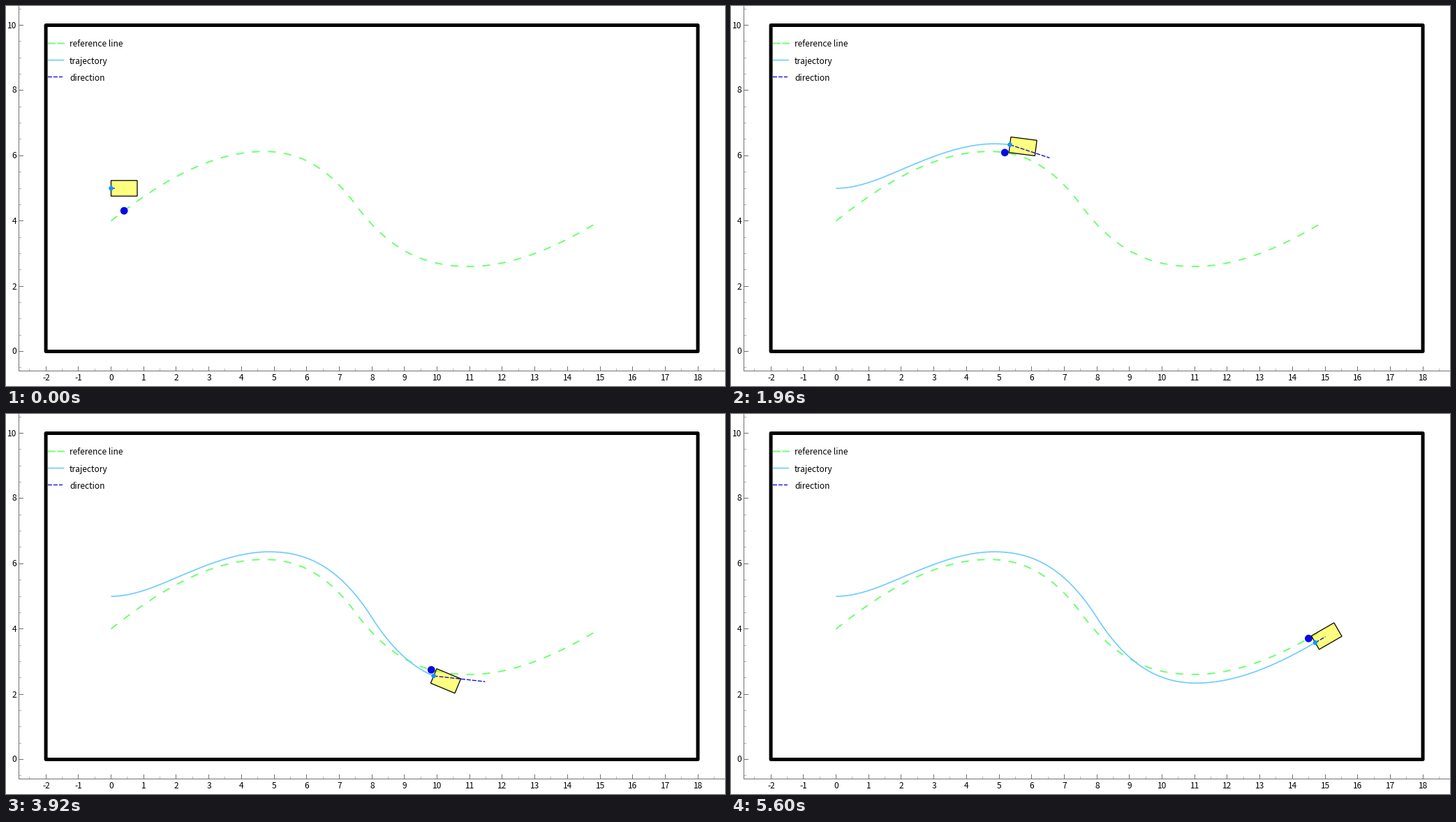
A matplotlib script for the animation above (5.64 s loop, 1030 by 544 pixels).

```python
import numpy as np
import matplotlib.pyplot as plt
from matplotlib.animation import FuncAnimation
from matplotlib.patches import Circle, Polygon, Rectangle

W, H, DPI = 1030, 544, 100
PX = 72 / DPI            # one pixel in points
UNIT = 46.7              # pixels per plot unit
X0, Y0 = 150.5, 494.5    # pixel place of the plot's zero
FRAMES, STEP = 141, 40
CAR_L, CAR_W = 37.5, 22.4
HORIZON, LAG = 12, .12   # steps looked ahead; how far the dot trails

GREEN, SKY, NAVY = "#70ff70", "#70ccff", "#0000e0"

# key points: x, y, slope
REFERENCE = [(0, 4, .8), (4.7, 6.13, 0), (7.5, 4.5, -1.36),
             (11, 2.605, 0), (15, 4, .6)]
TRACK = [(0, 5, 0), (2, 5.57, .43), (4.85, 6.365, 0), (8, 4.35, -1.57),
         (11.05, 2.34, 0), (14.7, 3.58, .577)]

plt.rcParams["path.snap"] = False


def curve(keys, count=3000):
    """Smooth cubic path through the key points."""
    x, y, m = np.array(keys, float).T
    q = np.linspace(x[0], x[-1], count)
    i = np.clip(np.searchsorted(x, q, side="right") - 1, 0, len(x) - 2)
    h, d = x[i + 1] - x[i], y[i + 1] - y[i]
    t = (q - x[i]) / h
    a, b = m[i] * h - d, d - m[i + 1] * h
    return q, y[i] + t * d + t * (1 - t) * (a * (1 - t) + b * t)


def sx(x):
    return X0 + UNIT * x


def sy(y):
    return Y0 - UNIT * y


ref_x, ref_y = curve(REFERENCE)
trk_x, trk_y = curve(TRACK)
arc = np.r_[0, np.cumsum(np.hypot(np.diff(trk_x), np.diff(trk_y)))]
heading = np.arctan(np.gradient(trk_y, trk_x))
bend = np.gradient(heading, arc)

# speed up, ease off in the first bend, brake at the end
n = np.arange(FRAMES)
pace = np.minimum(1, (n + 1) / 14) * np.clip((142.7 - n) / 12, 0, 1)
pace *= 1 - .2 * np.exp(-((n - 54) / 11) ** 4)
gone = np.r_[0, np.cumsum((pace[1:] + pace[:-1]) / 2)]
scale = arc[-1] / gone[-1]
place = np.searchsorted(arc, gone * scale).clip(0, len(arc) - 1)
speed = pace * scale

fig = plt.figure(figsize=(W / DPI, H / DPI), dpi=DPI, facecolor="white")
ax = fig.add_axes([0, 0, 1, 1])
ax.set_xlim(0, W)
ax.set_ylim(H, 0)
ax.axis("off")


def line(x, y, color, width, z, **kw):
    return ax.plot(x, y, color=color, lw=width * PX, zorder=z,
                   solid_capstyle="butt", **kw)[0]


def label(x, y, s, ha):
    ax.text(x, y, s, ha=ha, va="baseline", fontsize=12 * PX, color="black",
            family="Noto Sans CJK JP")


def draw_axes():
    grey, pale = "#707070", "#b4b4b4"
    line([18.5, 18.5], [0, 523], grey, 1, 1)
    line([18, W], [522.5, 522.5], grey, 1, 1)
    for k in range(-1, 22):
        y = np.floor(sy(k / 2)) + .5
        major = k % 4 == 0
        line([19, 25 if major else 22], [y, y], grey if major else pale, 1, 1)
        if major:
            label(15, y + 4, str(k // 2), "right")
    for k in range(-5, 38):
        x = np.floor(sx(k / 2)) + .5
        major = k % 2 == 0
        line([x, x], [516 if major else 519, 522], grey if major else pale, 1, 1)
        if major and k <= 36:
            label(x, 536, str(k // 2), "center")


def draw_legend():
    line([60, 84], [53.5, 53.5], GREEN, 2, 4, ls=(0, (5.5, 1.2)))
    line([60, 83], [77.5, 77.5], SKY, 1.7, 4)
    line([60, 81], [101.5, 101.5], NAVY, 1.3, 4, ls=(0, (4.6, 1.5)))
    for i, s in enumerate(("reference line", "trajectory", "direction")):
        label(91, 58.5 + 24.2 * i, s, "left")


draw_axes()
draw_legend()
ax.add_patch(Rectangle((sx(-2), sy(10)), 20 * UNIT, 10 * UNIT, fill=False,
                       ec="black", lw=5 * PX, joinstyle="round", zorder=3))
line(sx(ref_x), sy(ref_y), GREEN, 2, 4, ls=(0, (5.5, 5.9)))

track = line([], [], SKY, 1.7, 5)
dot = ax.add_patch(Circle((0, 0), 5.4, fc="#0808e6", ec="none", zorder=6))
body = ax.add_patch(Polygon(np.zeros((4, 2)), closed=True, fc=(1, 1, 0, .5),
                            ec="black", lw=1.25 * PX, zorder=7))
aim = line([], [], NAVY, 1.3, 8, ls=(0, (4.6, 1.5)))
axle = ax.add_patch(Circle((0, 0), 3.3, fc="#1496ff", ec="none", zorder=9))


def update(frame):
    i = place[frame]
    x, y, head = trk_x[i], trk_y[i], heading[i]
    px, py = sx(x), sy(y)
    c, s = np.cos(head), np.sin(head)

    track.set_data(sx(trk_x[:i + 1]), sy(trk_y[:i + 1]))
    axle.center = px, py

    rear = np.array([px, py])
    front = rear + CAR_L * np.array([c, -s])
    side = CAR_W / 2 * np.array([s, c])
    body.set_xy([rear - side, front - side, front + side, rear + side])

    # where the car would get to if it held its steering
    reach = HORIZON * speed[frame]
    ang = head + bend[i] * reach / 2
    aim.set_data([px, sx(x + reach * np.cos(ang))],
                 [py, sy(y + reach * np.sin(ang))])

    # closest reference point, slightly behind the car
    j = np.argmin(np.hypot(ref_x - x + LAG * c, ref_y - y + LAG * s))
    dot.center = sx(ref_x[j]), sy(ref_y[j])
    return track, dot, body, aim, axle


anim = FuncAnimation(fig, update, frames=FRAMES, interval=STEP,
                     init_func=lambda: update(0), repeat=True, repeat_delay=0,
                     blit=False)
plt.show()
```
